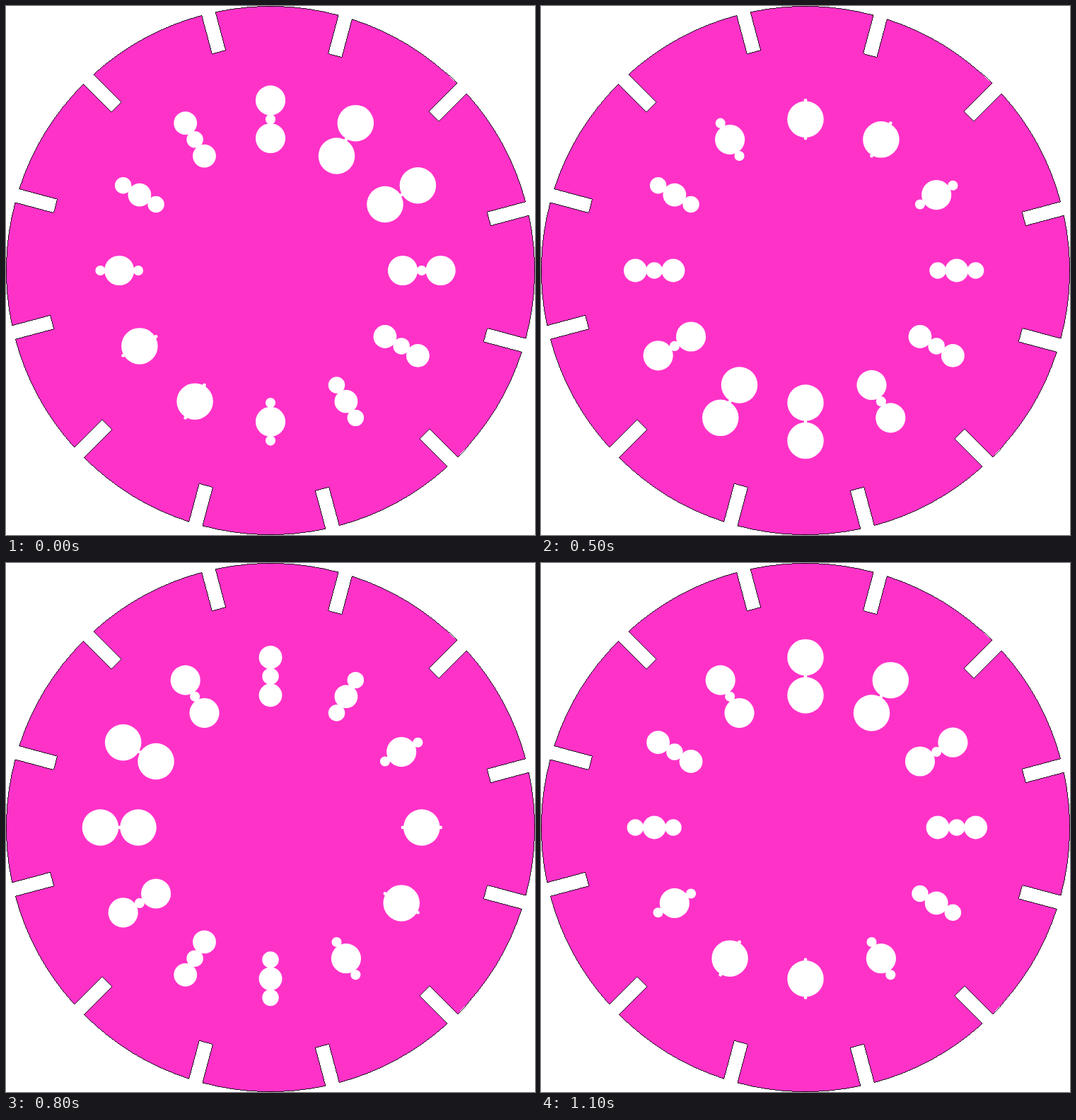
Animation, 748 px wide and 748 px high, one loop 1.2 s. Source, as an HTML page:

```html
<!DOCTYPE html>
<html lang="en">
<head>
<meta charset="utf-8">
<title>Notched disc</title>
<style>
  html, body { margin: 0; width: 100%; height: 100%; overflow: hidden; background: #fff; }
  svg { display: block; width: 100vw; height: 100vh; }
</style>
</head>
<body>
<svg viewBox="0 0 748 748">
  <path id="disc" fill="#ff32c8" stroke="#000" stroke-width="0.85" shape-rendering="crispEdges"/>
  <g id="dots" fill="#fff"></g>
</svg>
<script>
const COUNT = 12, STEP_MS = 100, CENTER = 374;
const DISC_R = 373.5, SLOT_R = 317.2, SLOT_LEFT = -0.6, SLOT_RIGHT = 19.4;
const RING_R = 213.8, GAP = 26.8;
const MAX_R = 25.75, R_STEP = 4.67;

// Point at a clockwise angle from the top, pushed sideways by `shift`.
function place(degrees, radius, shift = 0) {
  const a = degrees * Math.PI / 180;
  return [
    CENTER + radius * Math.sin(a) + shift * Math.cos(a),
    CENTER - radius * Math.cos(a) + shift * Math.sin(a)
  ];
}

function discPath() {
  const point = (...args) => place(...args).map(v => v.toFixed(2)).join(" ");
  const rim = (angle, shift) => point(angle, Math.sqrt(DISC_R ** 2 - shift ** 2), shift);
  const arcTo = end => `A${DISC_R} ${DISC_R} 0 0 1 ${end}`;
  let d = `M${rim(15, SLOT_LEFT)}`;
  for (let i = 0; i < COUNT; i++) {
    const angle = 15 + i * 30;
    d += `L${point(angle, SLOT_R, SLOT_LEFT)}L${point(angle, SLOT_R, SLOT_RIGHT)}`;
    d += `L${rim(angle, SLOT_RIGHT)}${arcTo(rim(angle + 30, SLOT_LEFT))}`;
  }
  return `${d}Z`;
}

function addDot(angle, radius) {
  const dot = document.createElementNS("http://www.w3.org/2000/svg", "circle");
  const [x, y] = place(angle, radius);
  dot.setAttribute("cx", x);
  dot.setAttribute("cy", y);
  document.getElementById("dots").append(dot);
  return dot;
}

document.getElementById("disc").setAttribute("d", discPath());
const groups = Array.from({ length: COUNT }, (_, i) =>
  [-GAP, 0, GAP].map(offset => addDot(i * 30, RING_R + offset)));

// The peak of the wave moves on by one group per step.
function render(time) {
  const peak = Math.floor(time / STEP_MS) % COUNT + 1.5;
  groups.forEach(([inner, middle, outer], i) => {
    const apart = Math.abs(i - peak) % COUNT;
    const level = Math.min(apart, COUNT - apart) - 0.5;
    const pairR = MAX_R - level * R_STEP;
    inner.setAttribute("r", pairR);
    outer.setAttribute("r", pairR);
    middle.setAttribute("r", MAX_R - (5 - level) * R_STEP);
  });
}

const start = performance.now();
function tick() {
  render(performance.now() - start);
  requestAnimationFrame(tick);
}
tick();
</script>
</body>
</html>
```
